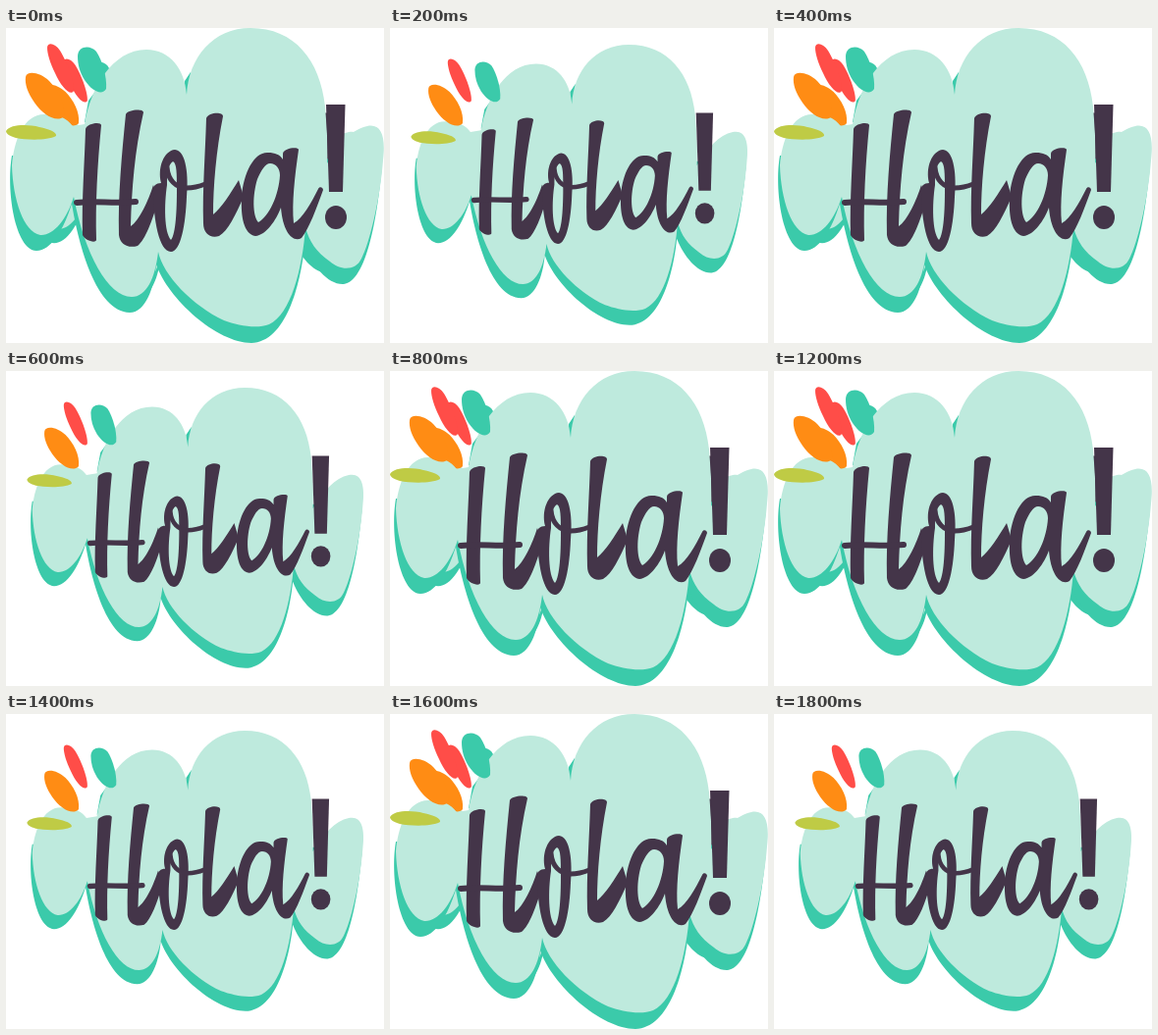
An HTML page that plays this animation: 385x321 px, repeating every 2 s.

```html
<!DOCTYPE html>
<html lang="es">
<head>
<meta charset="utf-8">
<title>Hola!</title>
<style>
  html, body { margin: 0; width: 100%; height: 100%; overflow: hidden; background: #fff; }
  svg { display: block; width: 385px; height: 321px; }
</style>
</head>
<body>
<svg viewBox="0 0 385 321" role="img" aria-label="Hola!">
  <defs>
    <g id="art">
      <!-- cloud shadow -->
      <g fill="#3bcaaa">
        <path d="M6 130C0 165 9 226 31 227C46 227 59 205 67 179C74 222 92 289 126 290C142 290 151 265 153 241C165 276 215 321 250 321C285 320 300 262 304 222C312 242 328 262 344 261C367 258 378 195 383 140L300 130L60 130Z"/>
        <path d="M182 54L188 45L188 80L181 76ZM84 74L90 66L90 96L80 96Z"/>
      </g>
      <!-- cloud -->
      <path fill="#beeadd" d="M6 140C8 115 18 87 40 88C54 88 62 92 68 100L80 98C86 62 108 22 143 22C167 22 182 42 184 68C186 30 211 0 249 0C294 0 320 33 325 80C327 105 328 120 327 138C340 118 352 103 368 100C382 97 387 110 384 135C381 175 370 220 362 235C356 248 340 247 330 238C316 228 309 218 305 203C302 245 290 292 268 302C255 307 236 303 222 298C190 283 160 252 155 228C152 255 143 274 128 274C104 274 80 230 69 172C62 195 48 212 35 211C18 208 7 175 6 140Z"/>
      <!-- petals -->
      <path fill="#3bcaaa" d="M73 29C73 18 86 17 92 24C98 33 103 50 102 62C98 69 88 65 80 53C75 45 73 37 73 29Z"/>
      <path fill="#ff4d48" d="M42 20C42 14 50 15 55 23C63 36 70 56 69 64C66 70 56 60 50 46C45 36 42 26 42 20Z"/>
      <path fill="#ff8c14" d="M20 50C21 43 35 45 44 54C53 63 61 78 59 90C52 97 38 89 29 76C22 66 19 57 20 50Z"/>
      <path fill="#bfcb45" d="M0 105C4 98 22 98 34 101C44 103 52 106 51 110C42 115 20 114 10 112C4 110 0 108 0 105Z"/>
      <!-- lettering -->
      <g fill="#443549">
        <path d="M81 103C82 97 97 95 97 99C93 140 91 180 92 216C91 220 80 216 78 211C77 175 80 138 81 103Z"/>
        <path d="M122 88C124 83 140 82 140 86C131 125 128 165 127 202C136 196 145 176 150 160L155 176C149 196 142 216 134 222C124 225 116 220 115 211C114 170 118 128 122 88Z"/>
        <path fill-rule="evenodd" d="M150 166C149 161 153 158 158 158C154 142 161 125 172 124C184 125 186 152 184 172C183 200 178 228 168 228C156 228 150 195 150 166ZM168 216C173 210 174 185 174 165C174 148 174 138 170 136C165 139 164 150 164 160C161 180 161 208 168 216Z"/>
        <path d="M204 92C206 86 221 85 221 90C214 125 211 162 211 190C219 184 229 168 237 155L242 172C234 190 226 207 217 212C208 215 201 209 201 199C200 164 203 128 204 92Z"/>
        <path fill-rule="evenodd" d="M282 128C283 122 298 121 298 124C294 152 291 178 293 199C302 194 311 178 318 164C319 161 323 162 323 165C316 184 309 204 301 214C292 219 282 208 280 183C275 196 265 211 254 212C242 210 239 192 240 172C242 147 253 126 267 127C274 127 279 129 282 134ZM269 138C275 138 279 143 279 150C278 170 268 192 257 198C251 191 251 170 256 154C260 145 264 138 269 138Z"/>
        <path d="M326 78H345.500L343 167H329Z"/>
        <ellipse cx="336" cy="193" rx="11" ry="12"/>
      </g>
      <g fill="none" stroke="#443549" stroke-linecap="round">
        <path stroke-width="6" d="M72 178C90 176 112 179 132 177"/>
        <path stroke-width="5" d="M164 142C165 155 173 163 184 163C192 163 198 161 203 159"/>
      </g>
    </g>
  </defs>
  <use href="#art" transform="translate(21.400 17) scale(.8905)"/>
  <use id="large" href="#art"/>
</svg>
<script>
  const BEAT = 200;
  const large = document.getElementById("large");
  const start = performance.now();

  // The large pose lands on top of the small one on every other beat.
  function tick() {
    const beat = Math.floor((performance.now() - start) / BEAT);
    large.style.visibility = beat % 2 ? "hidden" : "visible";
    requestAnimationFrame(tick);
  }
  tick();
</script>
</body>
</html>
```
